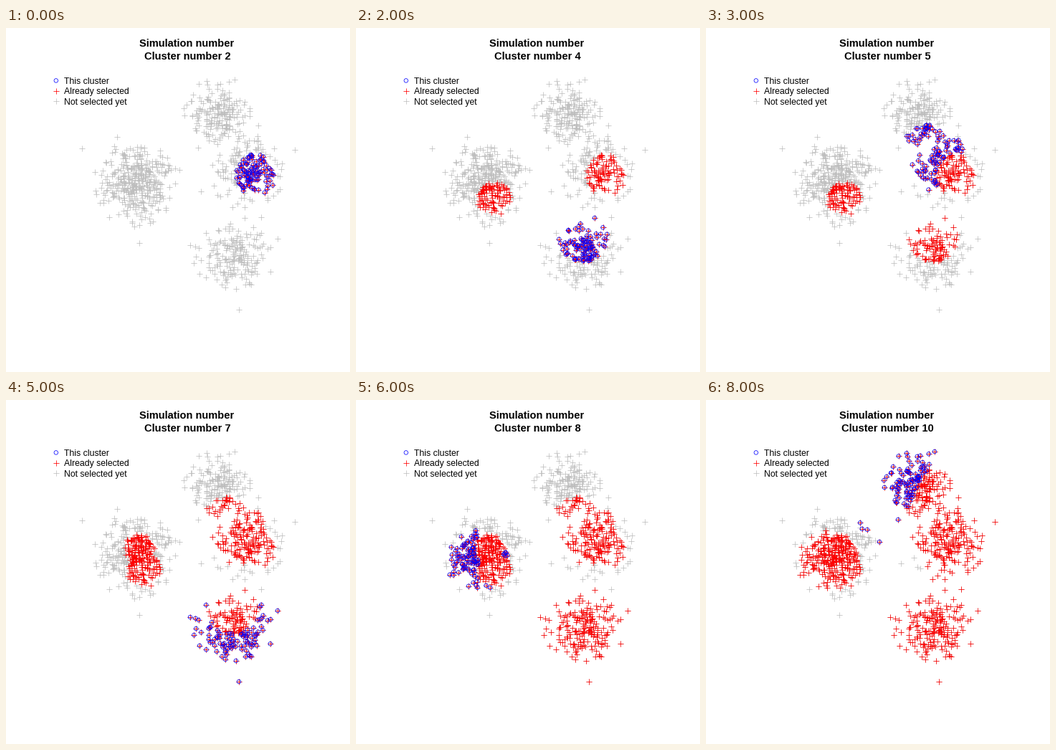
These frames come from a looping animation (480x480 px, 9000 ms). A matplotlib script:

```python
import matplotlib.pyplot as plt
import numpy as np
from matplotlib.animation import FuncAnimation

plt.rcParams["font.family"] = "Liberation Sans"
GREY, RED, BLUE = "#bebebe", "#ff0000", "#0000ff"
SIZE = 100  # points per cluster
rng = np.random.default_rng(12)

# Count, centre, spread, and the outermost points: left, top, right, bottom
BLOBS = [
    (400, (179, 216), (25, 25),
     [(106, 168), (155, 152), (242, 198), (186, 300)]),
    (200, (296, 119), (20, 20),
     [(249, 122), (319, 72), (352, 136), (268, 167)]),
    (200, (338, 199), (22, 23),
     [(272, 228), (351, 151), (403, 170), (356, 264)]),
    (200, (317, 319), (23, 22),
     [(257, 303), (333, 265), (379, 294), (325, 393)]),
]
SEEDS = [(350, 205), (192, 238), (317, 292), (315, 181), (186, 208),
         (325, 393), (170, 226), (403, 170), (319, 72)]


def blob(count, centre, spread, edge):
    """Normal cloud with evenly ranked radii and random directions."""
    n = count - len(edge)
    r = np.sqrt(-2 * np.log(np.linspace(0.05, 1, n)))
    a = rng.uniform(0, 2 * np.pi, n)
    core = centre + np.c_[r * np.cos(a), r * np.sin(a)] * spread
    return np.vstack([edge, core])


def cluster(xy):
    """Each seed in turn takes its nearest free points."""
    step = np.full(len(xy), len(SEEDS))
    for k, seed in enumerate(SEEDS):
        dist = np.hypot(*(xy - seed).T)
        dist[step < k] = np.inf
        step[np.argsort(dist)[:SIZE]] = k
    return step


xy = np.vstack([blob(*b) for b in BLOBS])
step = cluster(xy)

fig = plt.figure(figsize=(480 / 72, 480 / 72), dpi=72, facecolor="white")
ax = fig.add_axes([0, 0, 1, 1])
ax.set(xlim=(0, 480), ylim=(480, 0))
ax.axis("off")


def crosses(pts, color, z):
    return ax.scatter(*np.transpose(pts), s=8.2 ** 2, marker="+", c=color,
                      linewidths=0.75, zorder=z, snap=False)


def rings(pts, z):
    return ax.scatter(*np.transpose(pts), s=5.5 ** 2, marker="o",
                      facecolors="none", edgecolors=BLUE, linewidths=0.75,
                      zorder=z, snap=False)


crosses(xy, GREY, 1)
red = crosses(xy, RED, 2)
blue = rings(xy, 3)

rings([(69.8, 73.4)], 3)
crosses([(69.8, 87.8)], RED, 3)
crosses([(69.8, 102.2)], GREY, 3)
for i, label in enumerate(["This cluster", "Already selected",
                           "Not selected yet"]):
    ax.text(81, 77.8 + 14.4 * i, label, size=12.2)

bold = dict(size=14.6, weight="bold", ha="center")
ax.text(252, 26, "Simulation number", **bold)
title = ax.text(253.8, 44, "", **bold)


def draw(i):
    red.set_offsets(xy[step <= i])
    blue.set_offsets(xy[step == i])
    title.set_text(f"Cluster number {i + 2}")
    return red, blue, title


anim = FuncAnimation(fig, draw, frames=len(SEEDS), interval=1000,
                     repeat=True, repeat_delay=0)
plt.show()
```
